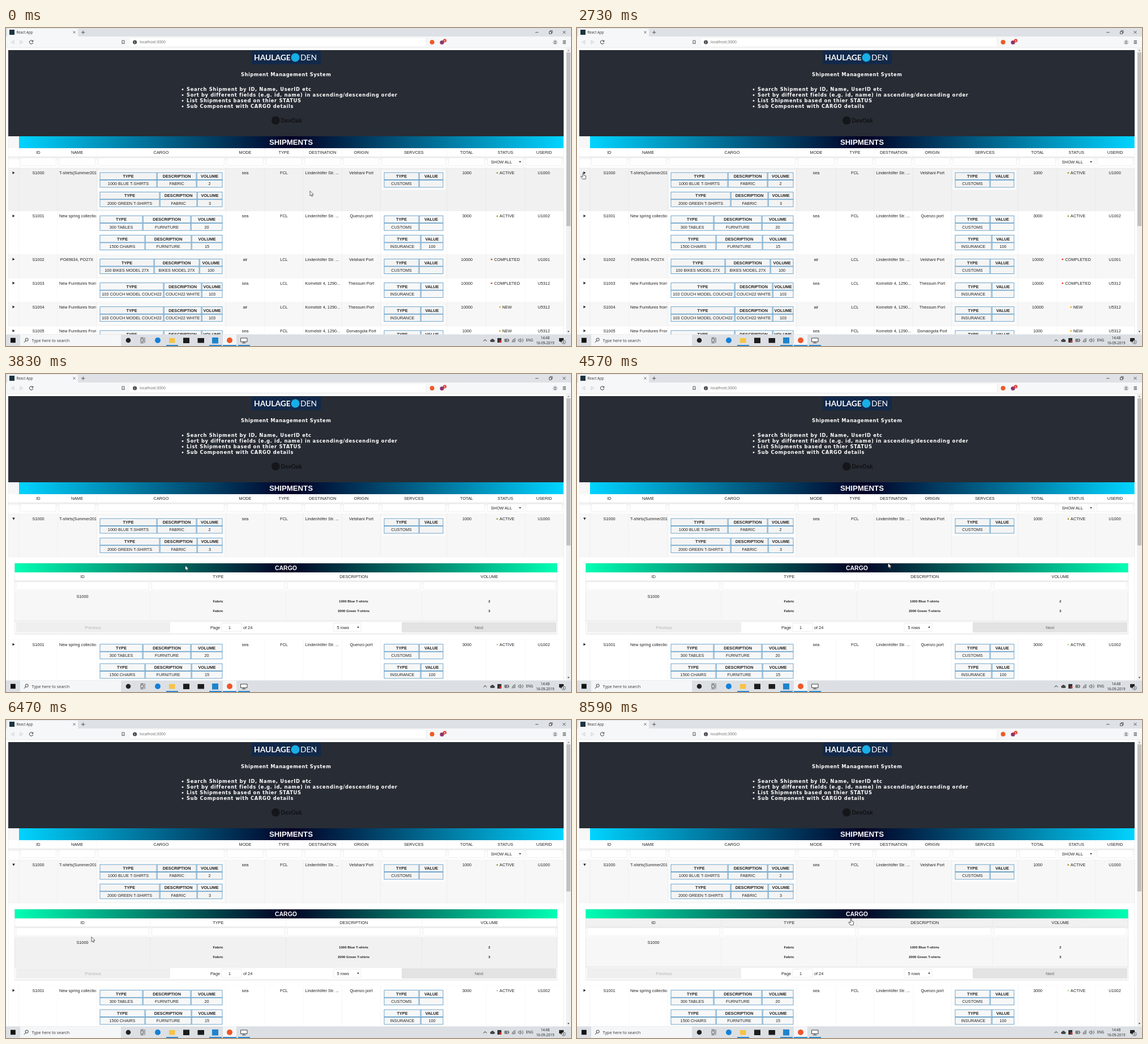
Write an HTML page that moves like this. It is 998 px wide and 561 px high and loops after 9.69 s.

```html
<!DOCTYPE html>
<html lang="en">
<head>
<meta charset="utf-8">
<title>Shipments</title>
<style>
html, body { margin: 0; width: 100%; height: 100%; overflow: hidden; background: #fff; }
svg { display: block; }
text { font-family: "Liberation Sans", Arial, sans-serif; white-space: pre; }
.ui { font-family: "Open Sans", "Noto Sans", sans-serif; }
.head { font-family: "DejaVu Sans", Verdana, sans-serif; }
.brand { font-family: Lato, sans-serif; }
</style>
</head>
<body>
<script>
const LOOP = 9690, OPEN_AT = 3090, SHIFT = 145.5;

const rect = (x1, y1, x2, y2, fill, extra = '') =>
  `<rect x="${x1}" y="${y1}" width="${x2 - x1}" height="${y2 - y1}" fill="${fill}" ${extra}/>`;
const circle = (x, y, r, fill, extra = '') =>
  `<circle cx="${x}" cy="${y}" r="${r}" fill="${fill}" ${extra}/>`;
const path = (d, stroke = '#333', width = 0.8, fill = 'none') =>
  `<path d="${d}" stroke="${stroke}" stroke-width="${width}" fill="${fill}"/>`;
const group = (content, extra = '') => `<g ${extra}>${content}</g>`;

// y is the middle of the capitals
function text(x, y, value, { size = 7.3, fill = '#222', anchor = 'middle', bold = false, cls = '', gap = 0 } = {}) {
  return `<text x="${x}" y="${(y + size * 0.36).toFixed(2)}" font-size="${size}" fill="${fill}" text-anchor="${anchor}"` +
    ` class="${cls}" font-weight="${bold ? 700 : 400}" letter-spacing="${gap}">${value}</text>`;
}
const label = (x, y, value, size, fill = '#333') => text(x, y, value, { size, fill, anchor: 'start', cls: 'ui' });
const input = (x1, y1, x2, y2) =>
  rect(x1, y1, x2, y2, '#fff', 'rx="1.5" stroke="#000" stroke-opacity=".12" stroke-width=".6"');
const vertical = (x, y1, y2) => rect(x - 0.3, y1, x + 0.3, y2, '#000', 'opacity=".06"');
const arrowDown = (x, y) => path(`M${x - 1.7} ${y - 1.2}h3.4l-1.7 2.6z`, 'none', 0, '#222');

const COLS = [23, 91, 160, 388, 457, 525, 593.5, 661.5, 779, 848, 916, 985];
const TITLES = ['ID', 'NAME', 'CARGO', 'MODE', 'TYPE', 'DESTINATION', 'ORIGIN', 'SERVCES', 'TOTAL', 'STATUS', 'USERID'];
const mid = i => (COLS[i] + COLS[i + 1]) / 2;

function browserChrome() {
  return rect(0, 0, 998, 15, '#dee1e6') + rect(2, 1, 127, 16, '#f6f7f8', 'rx="2"') + rect(0, 15, 998, 35, '#f6f7f8') +
    rect(6, 3, 15, 12, '#1d3440') + label(18.5, 7.7, 'React App', 6.2) +
    path('M118.5 5.5l4 4m0-4l-4 4M133 7.7h6.4m-3.2-3.2v6.4M935 7.7h5.5M983.5 5l5 5m0-5l-5 5M959.5 6.2h4v4h-4zM961 6v-1.3h4v4h-1.3') +
    path('M14 22v6l-5-3zM25 22v6l5-3z', '#c0c2c4') +
    path('M47.3 23.2a3.2 3.2 0 1 0 .4 2.6M47.8 21.5v2.4h-2.4', '#333', 1) +
    path('M205 22h4v6l-2-1.7-2 1.7z') +
    rect(219, 18, 742, 32, '#fff', 'rx="2"') + circle(227.6, 25, 3.5, '#45484c') +
    rect(227.2, 24.6, 228, 27, '#fff') + rect(227.2, 22.9, 228, 23.7, '#fff') +
    label(236, 24.9, 'localhost:3000', 6.8, '#666') +
    rect(742, 18, 742.5, 32, '#ddd') + circle(752.6, 25, 4, '#ee5a24') +
    circle(770, 25.5, 3.6, '#8f3568') + circle(775, 22.3, 3, '#e2342b') +
    text(775, 22.3, '8', { size: 4, fill: '#fff', bold: true }) +
    circle(970, 25, 4.3, '#d0d2d5') + circle(970, 23.8, 1.4, '#83878b') + path('M967.4 27.7a2.7 2.2 0 0 1 5.2 0z', 'none', 0, '#83878b') +
    path('M983.5 22.7h5.5m-5.5 2.3h5.5m-5.5 2.3h5.5', '#333', 1) + rect(0, 34.6, 998, 35.2, '#e2e2e2');
}

function pageHeader() {
  const line = (y, value) => circle(312, y + 0.4, 1.4, '#fff') +
    text(319, y, value, { size: 8.3, fill: '#fff', bold: true, cls: 'head', anchor: 'start', gap: 0.67 });
  return rect(4, 39, 985, 191, '#282c34') + rect(434, 40, 556, 64, '#12294a') +
    text(438, 52, 'HAULAGE', { size: 13.8, fill: '#fff', cls: 'brand', anchor: 'start', bold: true }) +
    circle(511, 52, 7.5, '#18aee6') +
    text(520, 52, 'DEN', { size: 13.8, fill: '#fff', cls: 'brand', anchor: 'start' }) +
    text(494.7, 81.6, 'Shipment Management System', { size: 8.3, fill: '#fff', bold: true, cls: 'head', gap: 0.5 }) +
    line(108, 'Search Shipment by ID, Name, UserID etc') +
    line(118, 'Sort by different fields (e.g. id, name) in ascending/descending order') +
    line(128, 'List Shipments based on thier STATUS') +
    line(138, 'Sub Component with CARGO details') +
    circle(476.3, 163, 7.3, '#14161a') +
    text(485.5, 163.3, 'DevOak', { size: 10, fill: '#101215', bold: true, anchor: 'start' });
}

function tableHead() {
  let out = rect(4, 191, 23, 212, '#f7f7f7') + rect(23, 191, 985, 212, 'url(#blue)') +
    text(503.5, 201.4, 'SHIPMENTS', { size: 13.2, fill: '#fff', bold: true }) +
    rect(4, 226.5, 985, 233, 'url(#shade)');
  TITLES.forEach((title, i) => {
    out += text(mid(i), 219.3, title) + vertical(COLS[i], 212, 247) + input(COLS[i] + 2.7, 229, COLS[i + 1] - 2.7, 243);
  });
  return out + text(856.5, 236.5, 'SHOW ALL', { anchor: 'start' }) + arrowDown(908, 236.3) +
    rect(4, 246.6, 985, 247.2, '#000', 'opacity=".06"');
}

// edges: the cell borders from left to right
function miniTable(top, edges, heads, values) {
  const row = (y, words, bold) => words.map((word, i) => {
    const x1 = edges[i] + (i ? 1.2 : 0), x2 = edges[i + 1];
    return rect(x1, y, x2, y + 12.6, '#000', 'fill-opacity=".03" stroke="#5797c4" stroke-width=".85"') +
      text((x1 + x2) / 2, y + 6.4, word, { bold });
  }).join('');
  return row(top, heads, true) + row(top + 13.4, values, false);
}

function miniTables(rowTop, x1, x2, heads, tables) {
  const bottom = rowTop + 38.5 + 34.3 * (tables.length - 1);
  return rect(x1, rowTop + 4.5, x2, bottom, '#fff', 'opacity=".7"') +
    tables.map(([edges, values], i) => miniTable(rowTop + 8 + 34.3 * i, edges, heads, values)).join('');
}

const CUSTOMS = [[668, 729, 772], ['CUSTOMS', '']];
const insurance = value => [[668, 732, 772], ['INSURANCE', value]];
const couch = [[166, 278, 345, 382], ['103 COUCH MODEL COUCH22', 'COUCH22 WHITE', '103']];
const LINDEN = 'Lindenhöfer Str. ...', KORNEL = 'Kornelstr 4, 1290...';
const GREEN = '#a89a20', RED = '#f03a20', AMBER = '#f0a818';

const ROWS = [
  { top: 247, name: 'T-shirts(Summer2019)', mode: 'sea', type: 'FCL', to: LINDEN, from: 'Velshani Port', total: 1000, status: 'ACTIVE', dot: GREEN, user: 'U1000',
    cargo: [[[166, 266, 336, 382], ['1000 BLUE T-SHIRTS', 'FABRIC', '2']], [[166, 271, 337, 382], ['2000 GREEN T-SHIRTS', 'FABRIC', '3']]], services: [CUSTOMS] },
  { top: 323.2, name: 'New spring collection', mode: 'sea', type: 'FCL', to: LINDEN, from: 'Quenzo port', total: 3000, status: 'ACTIVE', dot: GREEN, user: 'U1002',
    cargo: [[[166, 241, 326, 382], ['300 TABLES', 'FURNITURE', '20']], [[166, 245, 327, 382], ['1500 CHAIRS', 'FURNITURE', '15']]], services: [CUSTOMS, insurance('100')] },
  { top: 399.5, name: 'PO89634, PO27X', centred: true, mode: 'air', type: 'LCL', to: LINDEN, from: 'Velshani Port', total: 10000, status: 'COMPLETED', dot: RED, user: 'U1001',
    cargo: [[[166, 261, 341, 382], ['100 BIKES MODEL 27X', 'BIKES MODEL 27X', '100']]], services: [CUSTOMS] },
  { top: 441.6, name: 'New Furnitures from', mode: 'sea', type: 'LCL', to: KORNEL, from: 'Thessum Port', total: 10000, status: 'COMPLETED', dot: RED, user: 'U5312', cargo: [couch], services: [insurance('')] },
  { top: 483.7, name: 'New Furnitures from', mode: 'air', type: 'LCL', to: KORNEL, from: 'Thessum Port', total: 10000, status: 'NEW', dot: AMBER, user: 'U5312', cargo: [couch], services: [insurance('')] },
  { top: 525.8, name: 'New Furnitures From', mode: 'sea', type: 'FCL', to: KORNEL, from: 'Dorvangola Port', total: 1000, status: 'NEW', dot: AMBER, user: 'U5312', cargo: [couch], services: [insurance('')] },
];

function tableRow(row, i) {
  const { top } = row, y = top + 8.4;
  const bottom = ROWS[i + 1] ? ROWS[i + 1].top : top + 42;
  const half = { ACTIVE: 13, COMPLETED: 23, NEW: 8.3 }[row.status];
  const name = row.centred ? text(125, y, row.name) : text(94, y, row.name, { anchor: 'start' });
  return rect(4, top, 985, bottom, i % 2 ? '#fff' : '#f7f7f7', `id="row${i}"`) +
    COLS.map(x => vertical(x, top, bottom)).join('') +
    rect(4, bottom - 0.3, 985, bottom + 0.3, '#000', 'opacity=".06"') +
    path(`M11.5 ${y - 2.4}l4 2.4-4 2.4z`, 'none', 0, '#222').replace('<path', `<path id="tri${i}"`) +
    text(57, y, 'S' + (1000 + i)) + group(name, 'clip-path="url(#nameClip)"') +
    miniTables(top, 162, 386, ['TYPE', 'DESCRIPTION', 'VOLUME'], row.cargo) +
    text(422.5, y, row.mode) + text(491, y, row.type) +
    text(528.5, y, row.to, { anchor: 'start' }) + text(627.5, y, row.from) +
    miniTables(top, 664, 776, ['TYPE', 'VALUE'], row.services) +
    text(814, y, row.total) + circle(885 - half - 4.3, y + 0.3, 1.4, row.dot, `id="dot${i}"`) +
    text(885, y, row.status) + text(950, y, row.user);
}

function details() {
  const edges = [15.5, 255, 494.5, 734, 973.5];
  const bold = { size: 6.05, bold: true };
  let out = rect(4, 323.4, 985, 469, '#fff') + rect(15.5, 334, 973.5, 350, 'url(#mint)') +
    text(494.5, 342.2, 'CARGO', { size: 10.5, fill: '#fff', bold: true }) +
    rect(15.5, 350, 973.5, 364.5, '#fff', 'id="subHead"') + rect(15.5, 364.5, 973.5, 382.5, '#fff', 'id="subFilter"') +
    rect(15.5, 364, 973.5, 369, 'url(#shade2)') +
    rect(15.5, 382.5, 973.5, 434, '#f7f7f7', 'id="subRow"');
  ['ID', 'TYPE', 'DESCRIPTION', 'VOLUME'].forEach((title, i) => {
    out += text((edges[i] + edges[i + 1]) / 2, 357.2, title) + input(edges[i] + 2.6, 366.5, edges[i + 1] - 2.8, 381) +
      (i ? vertical(edges[i], 350, 434) : '');
  });
  out += text(135, 392, 'S1000');
  [['1000 Blue T-shirts', 2, 401], ['2000 Green T-shirts', 3, 418]].forEach(([item, volume, y]) => {
    out += text(374.5, y, 'Fabric', bold) + text(614, y, item, bold) + text(853.7, y, volume, bold);
  });
  return out + rect(15.5, 434, 973.5, 458, '#fff') + rect(15.5, 434, 973.5, 437.5, '#000', 'opacity=".06"') +
    rect(17.5, 437.7, 290, 456, '#efefef', 'rx="1.5"') + text(153.5, 447, 'Previous', { fill: '#b4b4b4' }) +
    text(361, 447, 'Page', { anchor: 'start' }) + input(380.5, 439.5, 416.5, 454) + text(395, 447, '1') +
    text(419, 447, 'of 24', { anchor: 'start' }) + input(578, 439.5, 627, 454) +
    text(584.5, 447, '5 rows', { anchor: 'start' }) + arrowDown(622, 447) +
    rect(699, 437.7, 972, 456, '#e3e3e3', 'rx="1.5"') + text(835.5, 447, 'Next', { fill: '#666' }) +
    rect(15.3, 334, 973.7, 458, 'none', 'stroke="#000" stroke-opacity=".12" stroke-width=".7"') +
    rect(15.5, 458, 973.5, 460, '#000', 'opacity=".04"') + rect(4, 468.6, 985, 469.2, '#000', 'opacity=".06"');
}

function scrollbar() {
  return rect(989, 35.2, 998, 540.5, '#f1f1f1') + rect(990, 43, 997, 349.5, '#c1c1c1', 'id="thumb"') +
    path('M991.7 40.6l1.8-2.4 1.8 2.4z', 'none', 0, '#8a8a8a') + path('M991.7 534.5l1.8 2.4 1.8-2.4z', 'none', 0, '#444');
}

function taskbar() {
  const dark = '#222', tall = y => ({ size: 6.2, cls: 'ui', fill: dark });
  let out = rect(0, 540.5, 998, 561, '#dce0e4') + rect(8, 546.7, 16.8, 555.2, '#111') +
    rect(25, 541, 203, 561, '#f5f6f7') + circle(36.7, 549.7, 2.6, 'none', 'stroke="#222" stroke-width=".9"') +
    path('M34.9 551.6l-3 3.2', dark, 1) + label(45.5, 551, 'Type here to search', 7.3) +
    circle(216, 551, 4.3, '#222') +
    path('M238 548.3h4.5v5H238zM237.5 546.3h5.5M237.5 555.5h5.5M245 546v9.5') +
    rect(383, 541, 407, 561, '#f3f5f6') +
    circle(268, 551, 5, '#1680d8') + rect(288, 547, 298.5, 555.5, '#f6c445') + rect(313, 546.5, 324, 556, '#1c1c1c') +
    rect(338.5, 547, 350, 555.5, '#1c1c1c') + rect(364, 546, 375, 556.5, '#1f83cc') + circle(395, 551, 5, '#f0562a') +
    path('M414.5 547h11.5v6.5h-11.5zM420 553.5v2M417 555.7h6.5', '#444', 1, '#f8f8f8');
  for (const [a, b] of [[283, 304], [359, 381], [383, 407], [410, 431]]) out += rect(a, 559.3, b, 561, '#1679c8');
  return out + path('M843.5 552.6l2.8-3 2.8 3', dark, 1) +
    path('M856.5 553.5a1.8 1.8 0 0 1 .5-3.4 2.6 2.6 0 0 1 4.8.3 1.6 1.6 0 0 1 .2 3.1z', dark, 0.6, '#444') +
    rect(868, 547, 875, 555, '#333') + circle(873.5, 553, 2, '#d92c2c') +
    path('M881 548.8h6.6v4.4H881zM888.3 550v2M882 550.2h3v1.7h-3z') +
    path('M894 554.3a7 7 0 0 1 6-6.3M896 554.3a5 5 0 0 1 4-4.2M898 554.3a3 3 0 0 1 2-2.2', dark, 0.8) +
    path('M905 549.7h1.5l2-2v6.6l-2-2H905z', dark, 0.6) + path('M910 549a3 3 0 0 1 0 4M911.8 547.6a5 5 0 0 1 0 6.8', dark, 0.6) +
    text(924.8, 551, 'ENG', tall()) + text(952.3, 546.3, '14:48', tall()) + text(952.3, 555.3, '16-09-2019', tall()) +
    path('M977 547h8v6h-3.5l-2 2v-2H977z', 'none', 0, dark) + circle(985, 554, 3.3, '#e8eaec', 'stroke="#222" stroke-width=".6"') +
    text(985, 554, '6', { size: 4.6 });
}

const CURSORS = {
  arrow: path('M0 0v8.6l2-1.8 1.3 3 1.5-.7-1.3-2.8h2.7z', '#222', 0.7, '#fff'),
  hand: path('M-.9.7q.9-1.2 1.8 0v4l3.1.8q.9.3.8 1.3l-.7 4.8h-5l-3.2-4q-.4-1.4 1-1.1l2.2 1.1z', '#222', 0.75, '#fff'),
  beam: path('M-2-4.5h1.4L0-4 .6-4.5H2M0-4v8M-2 4.5h1.4L0 4l.6.5H2', '#222', 0.7),
};

function gradient(id, edge) {
  return `<linearGradient id="${id}"><stop stop-color="${edge}"/><stop offset=".5" stop-color="#020024"/><stop offset="1" stop-color="${edge}"/></linearGradient>`;
}
const shade = id => `<linearGradient id="${id}" x2="0" y2="1"><stop stop-color="#000" stop-opacity=".08"/><stop offset="1" stop-color="#000" stop-opacity="0"/></linearGradient>`;

document.body.innerHTML = `<svg width="100%" height="100%" viewBox="0 0 998 561"><defs>` +
  gradient('blue', '#00d4ff') + gradient('mint', '#00ffb4') + shade('shade') + shade('shade2') +
  `<clipPath id="nameClip"><rect width="159.3" height="600"/></clipPath></defs>` +
  rect(0, 0, 998, 561, '#fff') + pageHeader() + tableRow(ROWS[0], 0) + group(details(), 'id="details"') +
  group(ROWS.slice(1).map((row, i) => tableRow(row, i + 1)).join(''), 'id="rest"') +
  tableHead() + rect(3.7, 191, 4.3, 541, '#e6e6e6') + rect(984.7, 191, 985.3, 541, '#e6e6e6') +
  scrollbar() + browserChrome() + taskbar() +
  group(Object.entries(CURSORS).map(([kind, d]) => group(d, `id="${kind}"`)).join(''), 'id="cursor"') + '</svg>';

// time, x, y of the pointer
const TRACK = [
  [0, 537, 287.5], [1510, 537, 287.5], [2250, 16, 256], [2430, 16, 256], [2570, 8, 257], [2730, 11, 255],
  [3350, 11, 255], [4010, 384, 356], [4060, 384, 356], [4570, 549.5, 333.5], [4990, 551, 330], [5040, 551, 330],
  [5200, 555, 327], [5560, 480.3, 320], [5990, 455, 375], [6470, 151, 382.7], [6620, 146.5, 376],
  [6890, 146.5, 376], [7120, 146.5, 374], [8110, 146.5, 374], [8590, 484, 349.9 + 0.2], [LOOP, 484, 350.1],
];
const HOVER = [['row0', 247, 323.2, '#f7f7f7'], ['subHead', 350, 364.5, '#fff'], ['subFilter', 364.5, 382.5, '#fff'], ['subRow', 382.5, 434, '#f7f7f7']];
const el = id => document.getElementById(id);
const set = (id, name, value) => el(id).setAttribute(name, value);

function pointerAt(t) {
  const i = Math.max(1, TRACK.findIndex(key => key[0] > t));
  const [t0, x0, y0] = TRACK[i - 1], [t1, x1, y1] = TRACK[i];
  const u = (t - t0) / (t1 - t0), k = u * u * (3 - 2 * u);
  return [x0 + (x1 - x0) * k, y0 + (y1 - y0) * k];
}

function cursorKind(x, y, open) {
  if (x < 23 && y > 247 && y < 323) return 'hand';
  if (open && y >= 350 && y < 364.5) return 'hand';
  const column = (x - 15.5) % 239.5;
  return open && y > 366.5 && y < 381 && column > 2.6 && column < 236.7 ? 'beam' : 'arrow';
}

function draw(now) {
  const t = now % LOOP, open = t >= OPEN_AT;
  const [x, y] = pointerAt(t), kind = cursorKind(x, y, open);
  set('cursor', 'transform', `translate(${x.toFixed(2)} ${y.toFixed(2)})`);
  for (const name in CURSORS) set(name, 'display', name === kind ? 'inline' : 'none');
  for (const [id, top, bottom, plain] of HOVER) set(id, 'fill', y >= top && y < bottom ? '#f1f1f1' : plain);
  set('details', 'display', open ? 'inline' : 'none');
  set('rest', 'transform', `translate(0 ${open ? SHIFT : 0})`);
  set('thumb', 'height', open ? 259.5 : 306.5);
  set('dot1', 'fill', open ? '#b4dca0' : GREEN);
  const turn = Math.min(1, Math.max(0, (t - OPEN_AT) / 300));
  set('tri0', 'transform', `rotate(${90 * turn * (2 - turn)} 13.5 255.4)`);
  requestAnimationFrame(draw);
}
draw(0);
</script>
</body>
</html>
```
